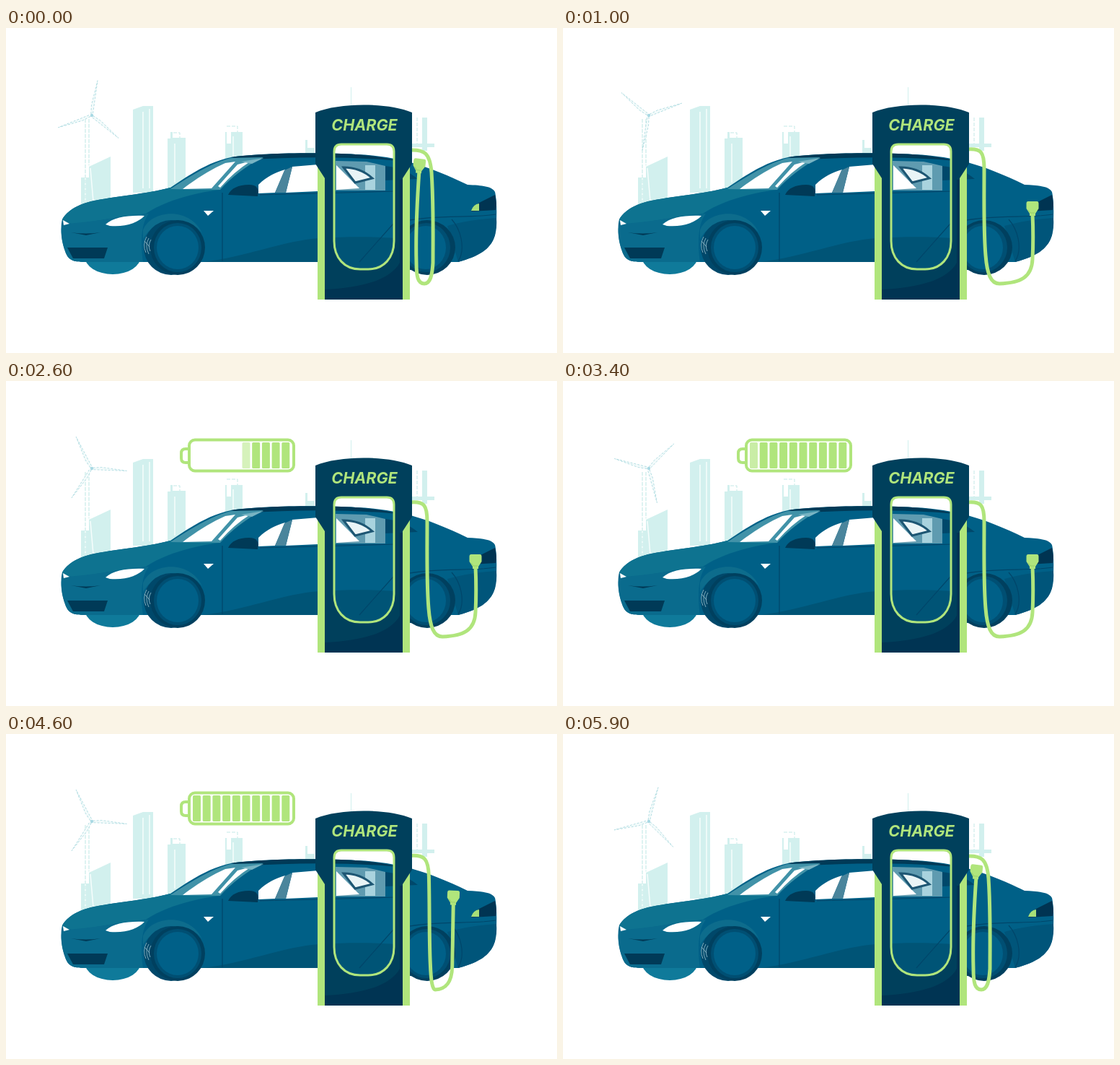
Write an HTML page that moves like this. It is 764x450 px and loops after 6000 ms.

```html
<!DOCTYPE html>
<html lang="en">
<head>
<meta charset="utf-8">
<title>Charging car</title>
<style>
html, body { margin: 0; width: 100%; height: 100%; overflow: hidden; background: #fff; }
svg { display: block; width: 100vw; height: 100vh; }
.sign { font: italic 700 21.5px Inter, sans-serif; fill: #b0e57c; }
</style>
</head>
<body>
<svg viewBox="0 0 764 450">
  <g id="city" fill="#d2f0ee">
    <path d="M104 245V207H115V192L145 178V245Z"/>
    <path d="M176 228V113L190 108H204V228Z"/>
    <path d="M224 222V153H228V144H231V152H249V222Z"/>
    <path d="M304 184V144H306V160H312V144H328V184Z"/>
    <path d="M415 177V155H418V166H428V177ZM478 82H479V108H478ZM577 170V124H584V170ZM563 160H594V165H563Z"/>
    <path d="M117 194L121 240M110 126V240M115 126V192M190 116V222M199 112V222M234 160V214M315 150V180" fill="none" stroke="#f6fdfc" stroke-width="1.5"/>
    <path d="M110 126V240M115 126V190M306 136H321V144M232 145H241V152M570 124V160" fill="none" stroke="#c4e9e7" stroke-dasharray="5 2"/>
  </g>
  <g id="rotor" fill="#f3fbfb" stroke="#b2dde2" stroke-width=".9" stroke-dasharray="3 2"></g>
  <circle cx="119" cy="121" r="2.2" fill="#a9d9e4"/>

  <g id="car">
    <ellipse cx="148" cy="316" rx="39" ry="25" fill="#0f7a9a"/>
    <path fill="#006087" d="M78 265C84 254 98 245 118 240C150 233 195 230 228 221C262 198 284 185 312 179C350 173 440 172 485 175C552 177 598 197 640 217C660 218 674 219 678 227C681 240 681 268 678 287C672 307 655 316 627 324H110C92 324 86 321 82 309C77 296 75 276 78 265Z"/>
    <path fill="#0e7390" d="M78 265C84 254 98 245 118 240C150 233 195 230 228 221L296 224C258 229 221 239 194 257C155 261 120 270 79 272Z"/>
    <path fill="#0a6b8d" d="M78 271C120 270 155 260 198 257C188 270 186 294 190 324H110C92 324 86 321 82 309C77 296 75 280 78 271Z"/>
    <path fill="#0d6c8c" d="M190 280C200 252 254 246 272 284C256 262 212 256 190 292Z"/>
    <path fill="#005476" d="M272 324C330 318 385 294 435 291C500 287 540 291 565 293V335H455V324Z"/>
    <path fill="#00557a" d="M612 274C640 266 665 264 680 263Q681 276 678 287C672 307 655 316 627 324Z"/>
    <path fill="#003a57" d="M312 179C350 173 440 172 485 175C510 177 530 180 545 184C480 178 400 178 330 183Z"/>

    <path fill="#4192a8" d="M228 223C262 201 285 187 312 180L357 179C335 189 312 207 297 224Z"/>
    <path fill="#fff" d="M245 223C264 208 284 196 304 187L318 185L285 222ZM294 219L321 189L340 184Q316 199 297 221Z"/>
    <path fill="#78b4c3" d="M326 185L357 180L341 188Z"/>
    <path fill="#fff" d="M350 217C362 205 374 200 387 196L373 228L350 229ZM397 192L433 189V226L388 228Z"/>
    <path fill="#4a859c" d="M386 197L397 192L388 228H373Z"/>
    <path fill="#5f9bb0" d="M457 184L500 185L526 191V225H457Z"/>
    <path fill="#fff" d="M458 190L490 222L458 224Z"/>
    <path fill="#a9d3de" d="M498 190H512V224H498Z"/>
    <path fill="#e9f4f6" stroke="#1d5673" stroke-width="3" d="M468 193C485 193 498 199 508 208L484 214Z"/>
    <path fill="#00486b" d="M526 191C545 193 559 199 571 209L526 211Z"/>
    <path fill="none" stroke="#00466a" stroke-width="1.2" d="M300 228V323M352 231L541 226M490 324L537 271M541 270C590 257 645 264 679 258M627 323C638 305 630 278 618 265"/>
    <path fill="#003a57" d="M308 231C312 222 322 217 337 217C348 217 351 222 349 233Z"/>

    <g id="wheels">
      <ellipse cx="229" cy="304" rx="38" ry="38" fill="#00486a"/>
      <ellipse cx="238" cy="304" rx="38" ry="38" fill="#00405f"/>
      <ellipse cx="238" cy="304" rx="33" ry="34" fill="#004f73"/>
      <ellipse cx="238" cy="304" rx="29" ry="30" fill="#006088"/>
      <ellipse cx="584" cy="304" rx="39" ry="38" fill="#00405f"/>
      <ellipse cx="583" cy="304" rx="33" ry="34" fill="#004f73"/>
      <ellipse cx="582" cy="304" rx="28" ry="30" fill="#006088"/>
      <path fill="none" stroke="#9fc3d0" stroke-width=".8" d="M195 289Q189 300 194 311M198 291Q192 301 198 313M192 295L199 303M201 293Q196 301 200 309"/>
    </g>

    <path fill="#fff" d="M138 272C149 262 169 259 192 260C184 269 166 276 144 274ZM79 266L88 271L80 273ZM274 253L288 253L280 260Z"/>
    <path fill="#003a57" d="M85 304H141L136 319H93ZM90 283Q110 286 131 283L111 287Z"/>
    <path fill="#003452" d="M645 254L656 242L678 231Q681 242 679 252Z"/>
    <path fill="#a8df78" d="M645 253Q648 244 656 243V253Z"/>
  </g>

  <path id="cable" fill="none" stroke="#b0e57c" stroke-width="5" stroke-linecap="round"/>
  <g id="plug">
    <path fill="#b0e57c" d="M-8.5 3Q-8.5 0 -6 0H6Q8.5 0 8.5 3V10L4 17V20H-4V17L-8.5 10Z"/>
    <path fill="none" stroke="#97cf69" d="M-6 12L-3 16H3"/>
  </g>

  <g id="pump">
    <path fill="#b0e57c" d="M432 188H443V376H432ZM548 188H560V376H548Z"/>
    <path fill="#00405c" fill-rule="evenodd" d="M429 117C462 103 530 103 563 117V188L550 208V376H442V208L429 188ZM465 161Q455 161 455 171V295C455 318 469 334 491 334H502C524 334 538 318 538 295V171Q538 161 528 161Z"/>
    <path fill="#003453" d="M442 362C490 360 532 350 546 325V376H442Z"/>
    <path fill="#003453" d="M546 210H550V376H546Z"/>
    <path fill="none" stroke="#b0e57c" stroke-width="3" d="M465 161Q455 161 455 171V295C455 318 469 334 491 334H502C524 334 538 318 538 295V171Q538 161 528 161Z"/>
    <text class="sign" x="497" y="142" text-anchor="middle">CHARGE</text>
  </g>

  <g id="battery">
    <path fill="#fff" stroke="#b0e57c" stroke-width="4" d="M254 94H249Q243 94 243 100V107Q243 113 249 113H254"/>
    <rect x="254" y="81.5" width="145" height="43" rx="8" fill="#fff" stroke="#b0e57c" stroke-width="4"/>
    <g id="bars" fill="#b0e57c"></g>
  </g>
</svg>
<script>
const $ = id => document.getElementById(id);
const clamp = x => Math.max(0, Math.min(1, x));
const ramp = (t, from, to) => clamp((t - from) / (to - from));
const smooth = x => x * x * (3 - 2 * x);
const mix = (a, b, k) => a + (b - a) * k;

const LOOP = 6, STEP = 0.1;
const hung = [560,169, 580,168, 588,173, 590,200, 593,245, 592,290, 592,325, 591,343,
  588,354, 580,354, 571,354, 569,344, 569,325, 568,290, 570,240, 573,197];
const plugged = [560,168, 580,166, 584,172, 584,195, 584,240, 583,280, 586,315, 588,340,
  593,354, 605,354, 635,353, 650,345, 651,320, 652,300, 652,280, 651,257];

$('rotor').innerHTML = [0, 120, 240].map(a =>
  `<path transform="rotate(${a})" d="M-1 -2L-2.5 -14L0 -49L1.5 -3Z"/>`).join('');
$('bars').innerHTML = Array.from({ length: 10 }, (_, i) =>
  `<rect x="${382.3 - 13.7 * i}" y="85" width="11" height="36" rx="1.5"/>`).join('');
const bars = [...$('bars').children];

function draw(t) {
  $('rotor').setAttribute('transform', `translate(118.5 121) rotate(${10 - 60 * t})`);

  const k = smooth(ramp(t, 0.1, 0.9)) - smooth(ramp(t, 4.3, 5));
  const p = hung.map((v, i) => mix(v, plugged[i], k));
  $('cable').setAttribute('d', `M${p.slice(0, 2)}C${p.slice(2)}`);
  $('plug').setAttribute('transform',
    `translate(${mix(574, 651, k)} ${mix(181, 240, k)}) rotate(${mix(6, 0, k)})`);

  const size = 1 - (1 - ramp(t, 1.2, 1.7)) ** 3 - ramp(t, 5.02, 5.5) ** 2;
  $('battery').setAttribute('transform', `translate(321 103) scale(${size}) translate(-321 -103)`);
  bars.forEach((bar, i) => bar.setAttribute('opacity', clamp((t - 1.9) / 0.155 - i)));
}

const start = performance.now();
function tick() {
  const t = (performance.now() - start) / 1000 % LOOP;
  draw(Math.floor(t / STEP + 1e-6) * STEP);
  requestAnimationFrame(tick);
}
tick();
</script>
</body>
</html>
```
